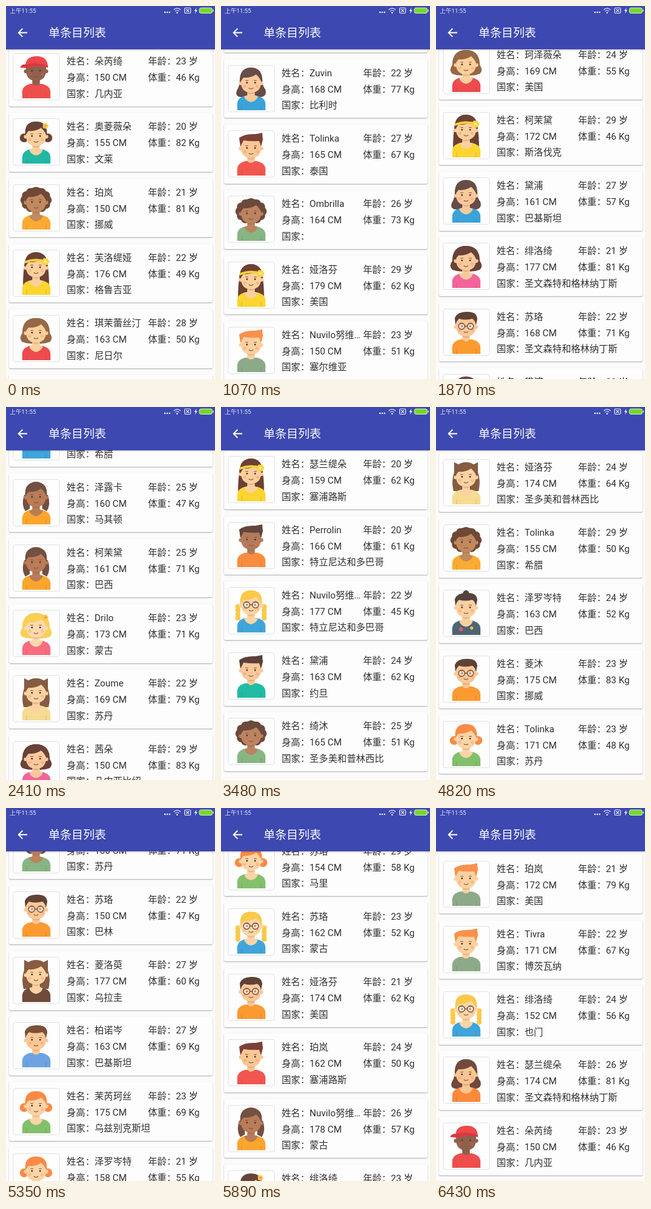
An HTML page that plays this animation: 334 px wide and 594 px high, repeating every 6820 ms.

```html
<!DOCTYPE html>
<html lang="zh-CN">
<head>
<meta charset="utf-8">
<title>单条目列表</title>
<style>
html, body { margin: 0; width: 100%; height: 100%; overflow: hidden; }
body { background: #fbfbfb; font-family: Roboto, "Noto Sans CJK SC", "Noto Sans CJK", sans-serif; }
#stage { position: relative; width: 334px; height: 594px; overflow: hidden; background: #fbfbfb; }
#list { position: absolute; left: 0; width: 334px; }
.row { position: absolute; left: 5px; width: 325px; height: 93.5px; background: #fdfdfd;
  border-radius: 2px; box-shadow: 0 1px 2px rgba(0, 0, 0, .32); }
.row svg { position: absolute; left: 6px; top: 9px; width: 73px; height: 73px;
  border: 1px solid #dfe2e4; border-radius: 4px; background: #fefefe; }
.row span { position: absolute; font-size: 14.85px; line-height: 26px; color: #303030; white-space: nowrap; }
.left { left: 92px; }
.right { left: 222px; }
.l1 { top: 9px; }
.l2 { top: 35px; }
.l3 { top: 60.5px; }
#bar { position: absolute; left: 0; top: 0; width: 334px; height: 69px; background: #3d48b0;
  color: #fff; box-shadow: 0 1px 2px rgba(0, 0, 0, .25); }
#bar span { position: absolute; white-space: nowrap; }
#clock { left: 6px; top: 0; font-size: 9.4px; line-height: 15px; color: #e4e6f6; }
#title { left: 68px; top: 30px; font-size: 18.4px; line-height: 26px; }
#bar svg { position: absolute; left: 0; top: 0; }
</style>
</head>
<body>
<div id="stage">
  <div id="list"></div>
  <div id="bar">
    <span id="clock">上午11:55</span>
    <span id="title">单条目列表</span>
    <svg width="334" height="69" fill="none" stroke="#fff">
      <path d="M34 42.5H20.5M26.5 36 20 42.5 26.5 49" stroke-width="1.8"/>
      <g fill="#e8eafa" stroke="none">
        <circle cx="254" cy="10" r="1.3"/><circle cx="257.7" cy="10" r="1.3"/><circle cx="261.4" cy="10" r="1.3"/>
        <circle cx="273.5" cy="10.7" r="1.3"/>
        <path d="M304.5 2.5 300.8 8H303L302 12.2 306 6.5H303.6Z"/>
      </g>
      <g stroke="#e8eafa" stroke-width="1.2">
        <path d="M268 6Q273.5 1.2 279 6M270.2 8.4Q273.5 5.6 276.8 8.4"/>
        <rect x="285.5" y="3" width="9.5" height="8.5" rx="1.5"/>
        <path d="M288 5 292.5 9.5M292.5 5 288 9.5"/>
      </g>
      <rect x="309" y="3" width="20.5" height="8.5" rx="2.5" fill="#74d82c" stroke="#d5efc4"/>
      <path d="M331.3 5.5V9" stroke="#d5efc4" stroke-width="1.3"/>
    </svg>
  </div>
</div>
<script>
const PITCH = 104.25, COUNT = 94, LOOP = 6820, STEPS = 25;

// key: hair style, hair, skin, shirt, extra
const LOOKS = {
  a: ['cap', '#f0474b', '#8f614c', '#ee4f4d', ''],
  b: ['buns', '#684438', '#fbd09c', '#22b8a5', 'flower'],
  c: ['afro', '#6f4936', '#c08a5e', '#fbab32', ''],
  d: ['long', '#6b4134', '#fbd09c', '#fcd530', 'band'],
  e: ['bob', '#966845', '#fbd09c', '#ee4b4e', ''],
  f: ['wave', '#674c47', '#fac99b', '#3aa3d9', ''],
  g: ['quiff', '#7b4138', '#fbc793', '#f25650', ''],
  h: ['afro', '#6b493c', '#bb8360', '#87b583', ''],
  i: ['quiff', '#f8914d', '#fcd1a0', '#8daa88', ''],
  j: ['tails', '#725043', '#b87c57', '#fba52d', ''],
  k: ['bob', '#fbcf56', '#fcd9ad', '#f76d7f', 'flower'],
  l: ['cat', '#855c42', '#fbd3a2', '#f6dc92', ''],
  m: ['bob', '#694239', '#fac99b', '#f3649b', ''],
  n: ['quiff', '#62453c', '#b37b5a', '#f98d3f', ''],
  o: ['braids', '#fac94a', '#fcd5a5', '#3fa5db', 'glasses'],
  p: ['quiff', '#5b4037', '#fac99a', '#22bba4', ''],
  q: ['short', '#7a5138', '#fac897', '#6da3e3', ''],
  r: ['knot', '#54423e', '#fbd0a0', '#4c6674', 'badge'],
  s: ['short', '#5e4236', '#fac897', '#fb9a31', 'glasses'],
  t: ['buns', '#fa8a45', '#fcd4a6', '#83c06b', ''],
  u: ['wave', '#704a3c', '#f9c592', '#fb8a3c', ''],
  v: ['cat', '#855c42', '#fbd3a2', '#6f4b3c', '']
};

const path = (d, fill) => `<path d="${d}" fill="${fill}"/>`;
const dot = (x, y, r, fill) => `<circle cx="${x}" cy="${y}" r="${r}" fill="${fill}"/>`;
const ring = (n, cx, cy, rx, ry, r, fill) => Array.from({ length: n }, (_, k) => {
  const a = k / n * Math.PI * 2;
  return dot((cx + rx * Math.cos(a)).toFixed(1), (cy + ry * Math.sin(a)).toFixed(1), r, fill);
}).join('');

const FRINGE = 'M19 27Q16 4 36 4Q56 4 53 27Q50 19 44 14Q36 20 24 19Q21 22 19 27Z';
const SHORT = 'M19 25 18 14Q22 4 36 4Q53 3 54 15L52 25Q50 17 46 15Q34 18 25 15Q21 18 19 25Z';
const QUIFF = 'M19 25 17 11Q26 4 43 5L54 3Q54 8 55 13L52 25 49 16Q36 17 24 15Z';
const LONG = 'M16 64Q14 50 17 26Q18 3 36 3Q54 3 55 26Q58 50 56 64Z';

function backHair(style, c) {
  switch (style) {
    case 'long': return path(LONG, c);
    case 'cat': return path('M16 50Q12 34 17 20L17 4 27 9Q36 5 45 9L55 4V20Q60 34 56 50Z', c);
    case 'wave': return path('M19 50Q9 48 14 38Q18 32 18 22Q19 3 36 3Q53 3 54 22Q54 32 59 38Q62 48 52 50Z', c);
    case 'bob': return path('M14 42Q8 36 14 28Q14 4 36 4Q58 4 58 28Q64 36 58 42Q48 46 36 44Q24 46 14 42Z', c);
    case 'afro': return dot(36, 24, 19, c) + ring(12, 36, 24, 18, 14, 7, c);
    case 'tails': return dot(36, 20, 17, c) + path('M17 24Q12 40 19 50L26 46V24ZM55 24Q60 40 53 50L46 46V24Z', c);
    case 'buns': return dot(17, 30, 7, c) + dot(55, 30, 7, c);
    case 'knot': return dot(36, 5, 5, c);
    case 'braids': return [30, 36, 42, 48].map(y => dot(15, y, 4, c) + dot(57, y, 4, c)).join('');
  }
  return '';
}

function frontHair(style, c) {
  if (style === 'cap') return path('M19 22Q18 4 37 4Q55 4 55 22Q36 17 26 23L11 22Q12 17 19 17Z', c)
    + path('M19 17Q36 12 55 19V22Q36 17 26 23L11 22Q12 17 19 17Z', '#d63a42');
  if (style === 'quiff') return path(QUIFF, c);
  if (style === 'short' || style === 'knot') return path(SHORT, c);
  return path(FRINGE, c);
}

function extras(kind) {
  if (kind === 'flower') return ring(5, 51, 11, 2.5, 2.5, 2.2, '#fbc84a') + dot(51, 11, 1.6, '#f08a4b');
  if (kind === 'band') return path('M18 17Q36 10 54 17V21Q36 14 18 21Z', '#fbcf39')
    + ring(6, 51, 18, 3.4, 3.4, 2.6, '#fcd43c') + dot(51, 18, 2, '#fff0ae');
  if (kind === 'glasses') return '<g fill="#fff" fill-opacity=".35" stroke="#765344" stroke-width="1.4">'
    + '<circle cx="29" cy="27" r="5"/><circle cx="43" cy="27" r="5"/><path d="M34 27h4"/></g>';
  if (kind === 'badge') return dot(28, 62, 3, '#ee5651') + dot(45, 60, 2.5, '#f8c447');
  return '';
}

function portrait([style, hair, skin, shirt, extra]) {
  const male = ['quiff', 'short', 'cap'].includes(style);
  const shade = 'rgba(130,60,30,.18)';
  return backHair(style, hair)
    + path('M14 71V61Q14 51 27 48H45Q59 51 59 61V71Z', shirt)
    + path('M20 71V62M53 71V62', 'none')
    + path(male ? 'M30 38H42V48Q36 54 30 48Z' : 'M30 38H42V47L47 49Q44 57 36 58Q28 57 25 49L30 47Z', skin)
    + path('M30 40Q36 45 42 40V43Q36 48 30 43Z', shade)
    + `<path d="M21 63V71M52 63V71" stroke="${shade}" stroke-width="1.2"/>`
    + dot(19.5, 28, 3, skin) + dot(52.5, 28, 3, skin)
    + path('M20 23Q20 10 36 10Q52 10 52 23V29Q50 43 36 43Q22 43 20 29Z', skin)
    + frontHair(style, hair)
    + dot(29.5, 27, 1.5, '#5a3d33') + dot(42.5, 27, 1.5, '#5a3d33')
    + dot(26, 33, 2.4, 'rgba(240,110,80,.25)') + dot(46, 33, 2.4, 'rgba(240,110,80,.25)')
    + '<path d="M27 23.5h4.5M40.5 23.5H45M32.5 35.5Q36 38.5 39.5 35.5" fill="none" stroke="#8a5545" stroke-width="1.2"/>'
    + extras(extra);
}

// first row: people as name, age, height, weight, country, look
const GROUPS = {
  0: `朵芮绮,23,150,46,几内亚,a
奥菱薇朵,20,155,82,文莱,b
珀岚,21,150,81,挪威,c
芙洛缇娅,22,176,49,格鲁吉亚,d
琪茉蕾丝汀,28,163,50,尼日尔,e`,
  15: `Zuvin,22,168,77,比利时,f
Tolinka,27,165,67,泰国,g
Ombrilla,26,164,73,,h
娅洛芬,29,179,62,美国,d
Nuvilo努维…,23,150,51,塞尔维亚,i`,
  33: `绮岚朵,24,162,58,希腊,o
泽露卡,25,160,47,马其顿,j
柯茉黛,25,161,71,巴西,j
Drilo,23,173,71,蒙古,k
Zoume,22,169,79,苏丹,l
茜朵,29,150,83,几内亚比绍,m`,
  49: `瑟兰缇朵,20,159,62,塞浦路斯,d
Perrolin,20,166,61,特立尼达和多巴哥,n
Nuvilo努维…,22,177,45,特立尼达和多巴哥,o
黛浦,24,163,62,约旦,p
绮沐,25,165,51,圣多美和普林西比,h`,
  59: `珞纱,26,166,58,斯洛伐克,e
朵沐芮,20,155,64,塔吉克斯坦,q
芮柯,24,171,79,喀麦隆,r
珂泽薇朵,23,168,56,斐济,s
茉岚纱,21,152,62,密克罗尼西亚,h
洛昙,23,153,75,马里,t`,
  74: `菱沐,25,160,71,苏丹,h
苏珞,22,150,47,巴林,s
菱洛萸,27,177,60,乌拉圭,v
柏诺岑,27,163,69,巴基斯坦,q
茉芮珂丝,23,175,69,乌兹别克斯坦,t
泽罗岑特,21,158,55,智利,t`,
  90: `珀岚,21,172,79,美国,i
Tivra,22,171,67,博茨瓦纳,i
绯洛绮,24,152,56,也门,o
瑟兰缇朵,26,174,81,圣文森特和格林纳丁斯,u`
};

const people = [];
for (const [start, text] of Object.entries(GROUPS))
  text.split('\n').forEach((line, k) => { people[+start + k] = line.split(','); });

// Fill the rest of the list with seeded people
let seed = 7;
const rand = n => (seed = seed * 16807 % 2147483647) % n;
const known = people.filter(Boolean);
const looks = Object.keys(LOOKS);
for (let i = 0; i < COUNT; i++)
  people[i] ||= [known[rand(known.length)][0], 20 + rand(10), 150 + rand(30), 45 + rand(39),
    known[rand(known.length)][4], looks[rand(looks.length)]];

function rowHtml(i) {
  const [name, age, height, weight, country, look] = people[i % COUNT];
  return `<div class="row" style="top:${i * PITCH}px"><svg viewBox="0 0 73 73">${portrait(LOOKS[look])}</svg>
<span class="left l1">姓名：${name}</span><span class="right l1">年龄：${age} 岁</span>
<span class="left l2">身高：${height} CM</span><span class="right l2">体重：${weight} Kg</span>
<span class="left l3">国家：${country}</span></div>`;
}

const list = document.getElementById('list');
list.innerHTML = Array.from({ length: COUNT + 6 }, (_, i) => rowHtml(i)).join('');

// step, row, y of that row's name
const STOPS = [[0, 0, 88], [4, 15, 107], [9, 34, 127], [13, 49, 91], [16, 60, 150], [20, 75, 146], [24, 90, 96]];
const topAt = ([, row, y]) => y - 22 - row * PITCH;

function scrollAt(step) {
  const k = Math.max(1, STOPS.findIndex(s => s[0] >= step));
  const from = STOPS[k - 1], to = STOPS[k];
  const p = (step - from[0]) / (to[0] - from[0]);
  return Math.round(topAt(from) + (topAt(to) - topAt(from)) * p);
}

// Steps last 270 ms, a few of them 10 ms less
const timeAt = step => 270 * step - 10 * [1, 6, 11, 16, 19].filter(s => s <= step).length;

const frames = Array.from({ length: STEPS }, (_, i) =>
  ({ top: scrollAt(i) + 'px', offset: timeAt(i) / LOOP, easing: 'steps(1, end)' }));
frames.push({ top: scrollAt(STEPS - 1) + 'px', offset: 1 });
list.animate(frames, { duration: LOOP, iterations: Infinity });
</script>
</body>
</html>
```
